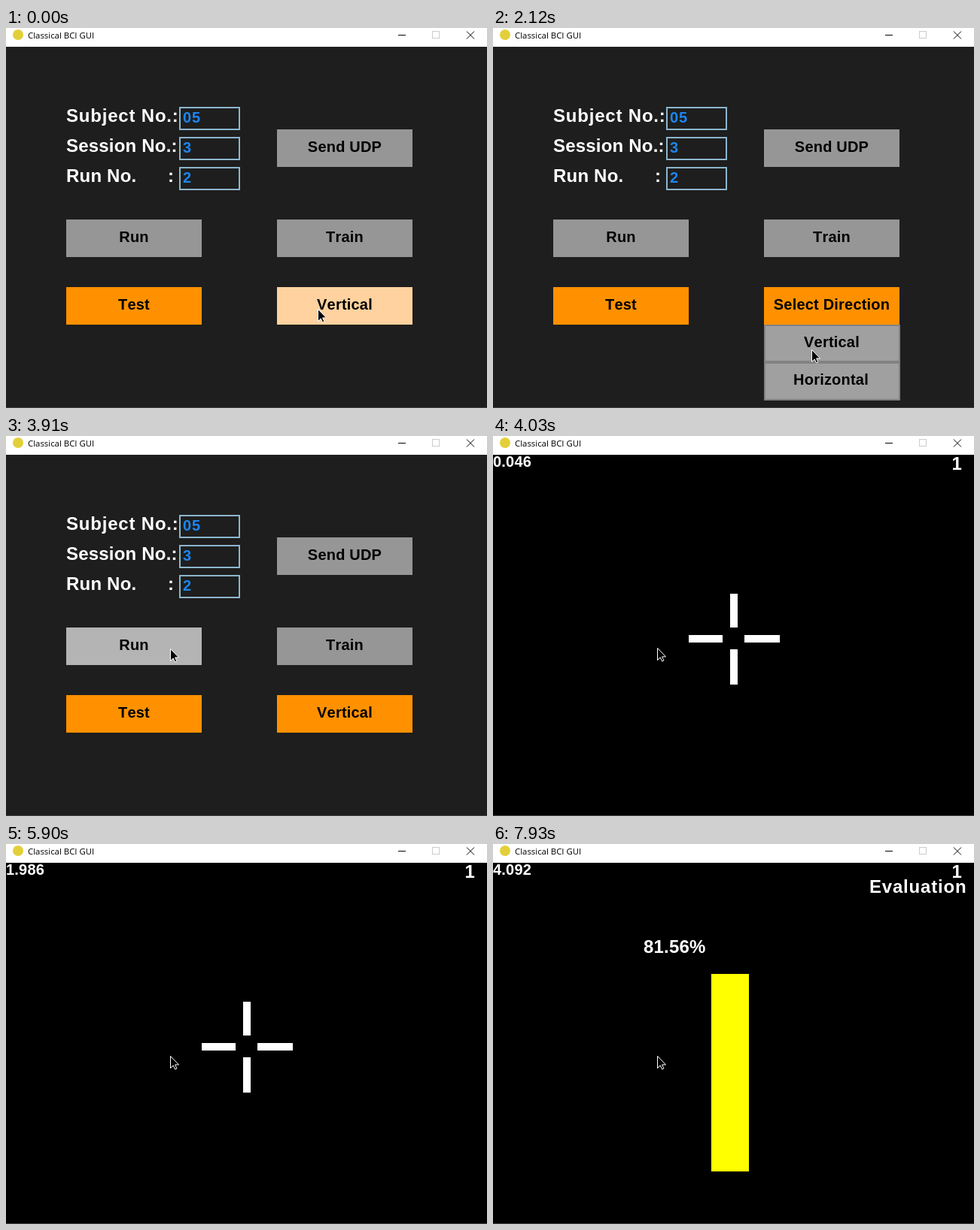
Write an HTML page that moves like this. It is 639 px wide and 506 px high and loops after 8000 ms.

```html
<!DOCTYPE html>
<html lang="en">
<head>
<meta charset="utf-8">
<title>Classical BCI GUI</title>
<style>
  html, body { margin: 0; width: 100%; height: 100%; overflow: hidden; background: #1e1e1e; }
  svg { display: block; width: 639px; height: 506px; }
  text { font: bold 20px "Liberation Sans", Arial, sans-serif; font-kerning: none; letter-spacing: .2px; }
  .big { font-size: 24px; fill: #fff; }
  .wide { letter-spacing: .8px; }
  .value { fill: #1c86ee; letter-spacing: .8px; }
  .mid { text-anchor: middle; }
  .title { font: 11.4px "Open Sans", "Noto Sans", sans-serif; letter-spacing: 0; }
  .field { fill: none; stroke: #8db6cd; stroke-width: 2; }
  .btn { fill: #969696; }
  .btn.hover { fill: #b4b4b4; }
  .btn.menu { fill: #ff9100; }
  .btn.menu.hover { fill: #ffd29f; }
  .option { fill: #a0a0a0; stroke: #828282; stroke-width: 2; }
  .off { display: none; }
</style>
</head>
<body>
<svg viewBox="0 0 639 506" shape-rendering="crispEdges">
  <rect width="639" height="506" fill="#1e1e1e"/>

  <g id="form">
    <text class="big wide" x="80" y="125">Subject No.:</text>
    <text class="big" x="80" y="165">Session No.:</text>
    <text class="big" x="80" y="205">Run No.</text>
    <text class="big" x="215" y="205">:</text>
    <rect class="field" x="231" y="106" width="79" height="29"/>
    <rect class="field" x="231" y="146" width="79" height="29"/>
    <rect class="field" x="231" y="186" width="79" height="29"/>
    <text class="value" x="235" y="126">05</text>
    <text class="value" x="235" y="166">3</text>
    <text class="value" x="235" y="206">2</text>

    <rect class="btn" x="360" y="135" width="180" height="50"/>
    <rect class="btn" x="80" y="255" width="180" height="50"/>
    <rect class="btn" x="360" y="255" width="180" height="50"/>
    <rect class="btn menu" x="80" y="345" width="180" height="50"/>
    <rect class="btn menu" x="360" y="345" width="180" height="50"/>
    <text class="mid" x="450" y="165">Send UDP</text>
    <text class="mid" x="170" y="285">Run</text>
    <text class="mid" x="450" y="285">Train</text>
    <text class="mid" x="170" y="375">Test</text>
    <text class="mid" x="450" y="375" id="choice">Vertical</text>

    <g id="options">
      <rect class="option" x="361" y="396" width="179" height="48"/>
      <rect class="option" x="361" y="446" width="179" height="49"/>
      <text class="mid" x="450" y="425">Vertical</text>
      <text class="mid" x="449" y="475">Horizontal</text>
    </g>
  </g>

  <g id="trial" fill="#fff">
    <rect y="25" width="639" height="481" fill="#000"/>
    <text x="0" y="41" id="clock">0.046</text>
    <text class="big" x="609.5" y="45">1</text>
    <path id="cross" d="M315 210h10v45h-10zM315 284h10v47h-10zM260 265h45v10h-45zM334 265h47v10h-47z"/>
    <path id="cue" shape-rendering="auto" d="M290 123h60v174h71L320 417 219 297h71z"/>
    <g id="result">
      <text class="big wide" x="500" y="65">Evaluation</text>
      <text class="big" x="200" y="145">81.56%</text>
      <rect x="290" y="173" width="50" height="263" fill="#ff0"/>
    </g>
  </g>

  <rect y="505" width="639" height="1" fill="#3c3c3c"/>
  <rect width="639" height="25" fill="#fff"/>
  <circle cx="16" cy="9" r="7" fill="#e3cf3a" shape-rendering="auto"/>
  <text class="title" x="29" y="14">Classical BCI GUI</text>
  <g fill="none" stroke="#000">
    <path d="M521 9.5h10"/>
    <rect x="566.5" y="4.5" width="9" height="9" stroke="#ccc"/>
    <path d="M612 4.5l10 10M622 4.5l-10 10" shape-rendering="auto"/>
  </g>

  <path id="pointer" d="M.5 .5v16l3.7-3.6 2.4 5.1 2.3-1-2.3-5.1h4.9z" fill="#000" stroke="#fff" shape-rendering="auto"/>
</svg>
<script>
  const LOOP = 8000, OPEN = 740, CHOSEN = 3100, START = 4030, CUE = 6020, RESULT = 7930;
  const $ = id => document.getElementById(id);
  const show = (id, on) => $(id).classList.toggle('off', !on);

  // n evenly spaced moments from a to b
  const run = (a, b, n) => Array.from({ length: n }, (_, i) => a + (b - a) * i / (n - 1));

  // The screen refreshes only at these moments
  const ticks = [0, 150, 460, OPEN, 1170, ...run(1420, 2120, 6), 2240, 2360, 2670, 2830,
    CHOSEN, ...run(3250, 3910, 6), START, ...run(4150, 5080, 8), ...run(5200, 5900, 6),
    CUE, 6140, ...run(6290, 7260, 8), ...run(7380, RESULT, 5)];

  // Pointer path: time, x, y
  const path = [[0, 414, 374], [150, 415, 373], [460, 415, 372], [740, 415, 372],
    [1170, 421, 411], [1420, 422, 424], [1700, 426, 458], [1840, 426, 456], [2120, 423, 428],
    [2240, 428, 426], [2360, 433, 425], [2670, 428, 430], [2830, 432, 434],
    [3100, 548, 484], [3250, 520, 467], [3780, 219, 284], [3910, 218, 283], [4030, 218, 282]];

  function pointerAt(t) {
    const i = path.findIndex(p => p[0] > t);
    if (i < 0) return path[path.length - 1].slice(1);
    const [t0, x0, y0] = path[i - 1], [t1, x1, y1] = path[i];
    const k = (t - t0) / (t1 - t0);
    return [Math.round(x0 + (x1 - x0) * k), Math.round(y0 + (y1 - y0) * k)];
  }

  const buttons = [...document.querySelectorAll('.btn')].map(el => ({
    el, x: +el.getAttribute('x'), y: +el.getAttribute('y')
  }));

  function render(t) {
    const [px, py] = pointerAt(t);
    $('pointer').setAttribute('transform', `translate(${px} ${py})`);
    for (const { el, x, y } of buttons)
      el.classList.toggle('hover', px >= x && px < x + 180 && py >= y && py < y + 50);

    const open = t >= OPEN && t < CHOSEN;
    $('choice').textContent = open ? 'Select Direction' : 'Vertical';
    show('options', open);
    show('form', t < START);
    show('trial', t >= START);
    show('cross', t < CUE);
    show('cue', t >= CUE && t < RESULT);
    show('result', t >= RESULT);
    $('clock').textContent = (0.046 + Math.max(0, t - START) * 0.00103743).toFixed(3);
  }

  const began = performance.now();
  let last = -1;
  function frame() {
    const t = (performance.now() - began) % LOOP;
    const tick = ticks.filter(m => m <= t).pop();
    if (tick !== last) render(last = tick);
    requestAnimationFrame(frame);
  }
  frame();
</script>
</body>
</html>
```
